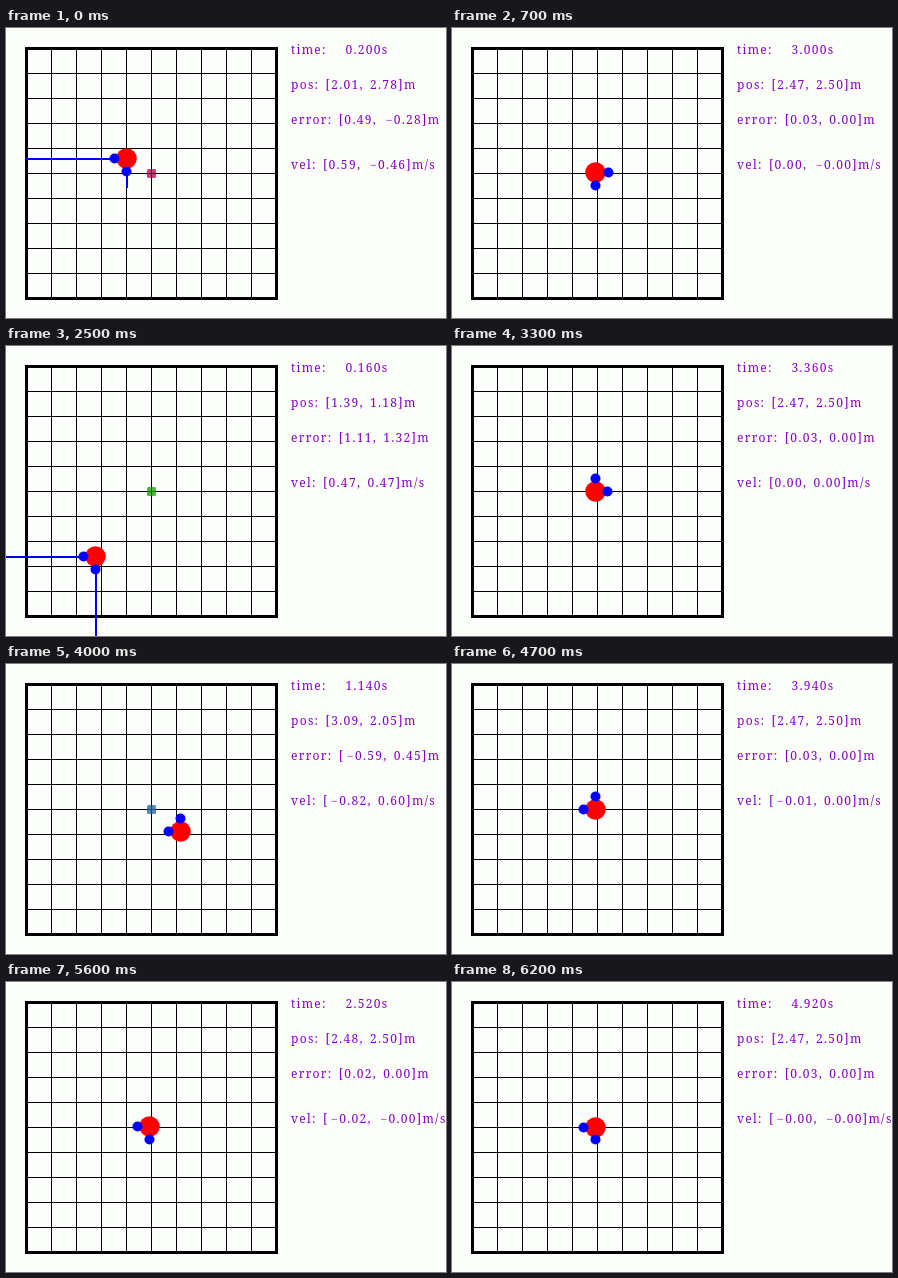
Write an HTML page with a canvas that moves like this. It is 440 by 290 pixels and loops after 6300 ms.

```html
<!DOCTYPE html>
<html lang="en">
<head>
<meta charset="utf-8">
<title>Thruster position control</title>
<style>
html, body { margin: 0; width: 100%; height: 100%; overflow: hidden; background: #fcfefc; }
canvas { display: block; }
</style>
</head>
<body>
<canvas id="stage" width="440" height="290"></canvas>
<script>
const ctx = document.getElementById('stage').getContext('2d');
const LOOP = 6300, STEP = 100, SCALE = 50, DECAY = 3.5;
const GOAL = 2.5, REST = { x: 2.47, y: 2.5 };

// One known state per run, each axis as [position, velocity, acceleration]
const runs = [
  { at: 0.2, x: [2.01, 0.59, 2.02], y: [2.782, -0.46, 0.58], color: '#b1004c' },
  { at: 1.18, x: [2.32, 0.58, -0.94], y: [2.4, 0.11, 0.65], color: '#248117' },
  { at: 0.16, x: [1.39, 0.47, 3], y: [1.184, 0.47, 3], color: '#179c00' },
  { at: 1.94, x: [2.6, -0.25, 1.3], y: [2.43, 0.24, -0.85], color: '#2060a0' },
  { at: 0.92, x: [3.05, -1.26, 1.71], y: [2.4, 0.34, -0.59], color: '#970081' }
];

// From standstill to the known state with linearly changing acceleration
function launch([pos, vel, acc], at, t) {
  const jerk = 2 * (acc - vel / at) / at;
  return {
    pos: pos + vel * t + acc * t * t / 2 + jerk * t ** 3 / 6,
    vel: vel + acc * t + jerk * t * t / 2,
    acc: acc + jerk * t
  };
}

// From the known state to rest: exp(-DECAY t) * (a + b t + c t^2)
function settle([pos, vel, acc], rest, t) {
  const a = pos - rest, b = vel + DECAY * a;
  const c = (acc - DECAY * DECAY * a + 2 * DECAY * b) / 2;
  const p = a + b * t + c * t * t, dp = b + 2 * c * t;
  const fade = Math.exp(-DECAY * t);
  return {
    pos: rest + fade * p,
    vel: fade * (dp - DECAY * p),
    acc: fade * (2 * c - 2 * DECAY * dp + DECAY * DECAY * p)
  };
}

function motion(run, axis, time) {
  const t = time - run.at;
  return t < 0 ? launch(run[axis], run.at, t) : settle(run[axis], REST[axis], t);
}

function disc(x, y, r, color) {
  ctx.fillStyle = color;
  ctx.beginPath();
  ctx.arc(x, y, r, 0, 2 * Math.PI);
  ctx.fill();
}

function line(x1, y1, x2, y2) {
  ctx.beginPath();
  ctx.moveTo(x1, y1);
  ctx.lineTo(x2, y2);
  ctx.stroke();
}

const snap = v => Math.floor(v + 0.01);

// Exhaust points away from the force
function thruster(x, y, dx, dy, acc) {
  const side = acc < 0 ? 1 : -1, length = Math.abs(acc) * SCALE;
  const at = d => [snap(x + dx * side * d), snap(y + dy * side * d)];
  ctx.lineWidth = 2;
  ctx.strokeStyle = '#00f';
  if (length > 12.5) line(...[...at(12.5), ...at(length)].map(v => v + 0.5));
  disc(...at(12.5), 5, '#00f');
}

// The hair space widens the minus sign
const number = n => n.toFixed(2).replace('-', '\u200a\u2212');
const pair = (a, b) => `[${number(a)}, ${number(b)}]`;
const error = pos => GOAL - pos.toFixed(2);

function draw(step) {
  const hundredths = 20 + 40 * step;
  const run = runs[Math.floor(hundredths / 502)];
  const time = hundredths % 502 / 100;
  const h = motion(run, 'x', time), v = motion(run, 'y', time);
  const x = 20 + SCALE * h.pos, y = 270 - SCALE * v.pos;

  ctx.setTransform(1, 0, 0, 1, 0, 0);
  ctx.fillStyle = '#fcfefc';
  ctx.fillRect(0, 0, 440, 290);
  ctx.translate(0.5, 0.5);
  ctx.strokeStyle = '#000';
  ctx.lineWidth = 1;
  for (let p = 45; p < 270; p += 25) {
    line(p, 20, p, 270);
    line(20, p, 270, p);
  }
  ctx.lineWidth = 3;
  ctx.strokeRect(20, 20, 250, 250);

  ctx.globalAlpha = 0.75;
  ctx.fillStyle = run.color;
  ctx.beginPath();
  ctx.roundRect(140.5, 140.5, 9, 9, 1.5);
  ctx.fill();
  ctx.globalAlpha = 1;
  disc(snap(x), snap(y), 10.3, '#f00');
  thruster(x, y, 1, 0, h.acc);
  thruster(x, y, 0, -1, v.acc);

  ctx.font = '500 12px "Noto Serif", serif';
  ctx.letterSpacing = '1.3px';
  ctx.wordSpacing = '1.8px';
  ctx.fillStyle = '#8800c8';
  const write = (text, baseline) => ctx.fillText(text, 284.5, baseline);
  write(`time:   ${time.toFixed(3)}s`, 25);
  write(`pos: ${pair(h.pos, v.pos)}m`, 60);
  write(`error: ${pair(error(h.pos), error(v.pos))}m`, 95);
  write(`vel: ${pair(h.vel, v.vel)}m/s`, 140);
}

function tick() {
  draw(Math.floor(performance.now() % LOOP / STEP));
  requestAnimationFrame(tick);
}
tick();
</script>
</body>
</html>
```
